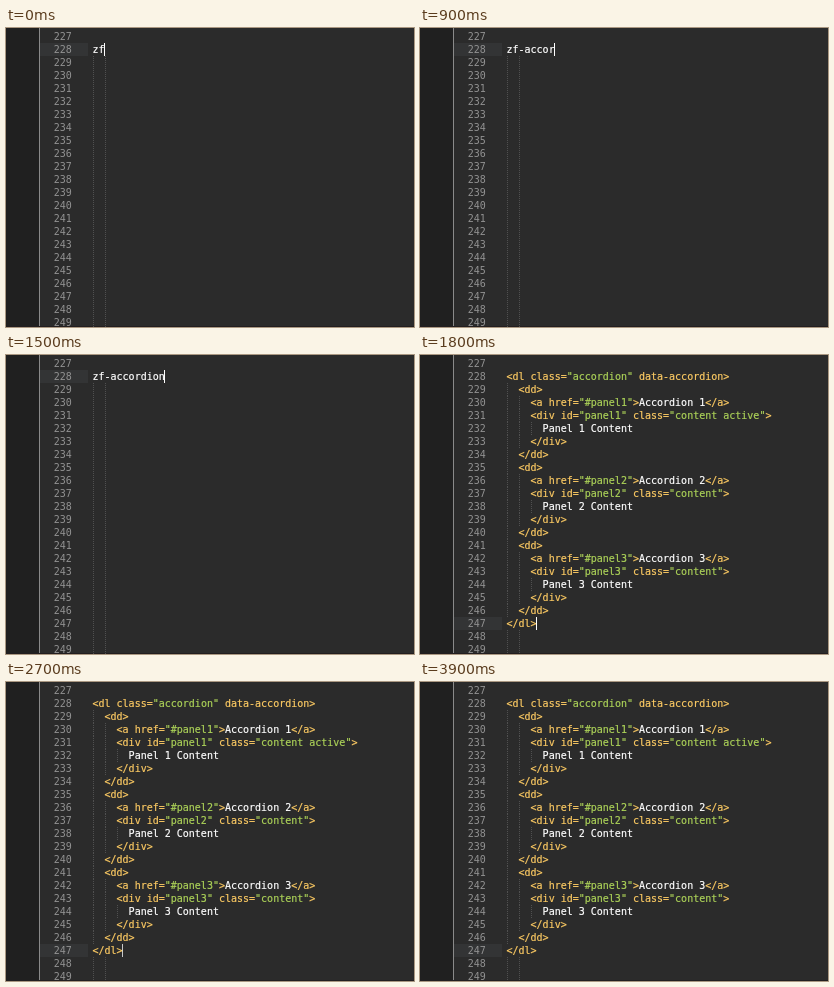
Write an HTML page that moves like this. It is 408x299 px and loops after 3940 ms.

```html
<!DOCTYPE html>
<html lang="en">
<head>
<meta charset="utf-8">
<title>Snippet expansion</title>
<style>
  html, body { margin: 0; width: 100%; height: 100%; overflow: hidden; background: #2b2b2b; }
  svg { display: block; width: 408px; height: 299px; }
  text {
    font: 10px "DejaVu Sans Mono", "Liberation Mono", monospace;
    white-space: pre;
    stroke-width: .2px;
  }
  .number { fill: #929292; }
  .plain { fill: #fff; stroke: #fff; }
  .tag { fill: #fcca63; stroke: #fcca63; }
  .string { fill: #acd258; stroke: #acd258; }
  .guide { stroke: #505050; stroke-dasharray: 1 1; }
</style>
</head>
<body>
<svg id="stage" viewBox="0 0 408 299"></svg>
<script>
const LOOP = 3940;
const EXPAND_AT = 1800;
const LINE = 13, CHAR = 6.02, LEFT = 86.5;
const FIRST = 227, LAST = 249, START = 228;
const WORD = "zf-accordion";

// [time, visible characters]
const typing = [[0, 2], [150, 3], [300, 4], [600, 5], [750, 6], [900, 8], [1200, 9], [1350, 11], [1500, 12]];
// [time, caret opacity]
const blink = [[0, 1], [2100, .5], [2250, 0], [2700, .75], [2850, 1], [3150, .5], [3300, 0], [3750, .5], [3900, 0]];

const stage = document.getElementById("stage");
const top_ = line => 2 + (line - FIRST) * LINE;
const baseline = line => top_(line) + 10;

function add(parent, name, attrs = {}, content = "") {
  const node = document.createElementNS("http://www.w3.org/2000/svg", name);
  for (const key in attrs) node.setAttribute(key, attrs[key]);
  node.textContent = content;
  parent.appendChild(node);
  return node;
}

const rect = (x, y, width, height, fill) => add(stage, "rect", { x, y, width, height, fill });

function guide(parent, level, from, to) {
  const x = 87.5 + level * 12;
  add(parent, "line", { class: "guide", x1: x, x2: x, y1: top_(from), y2: top_(to + 1) });
}

function panel(n) {
  const active = n === 1 ? " active" : "";
  return [
    "  <dd>",
    `    <a href="#panel${n}">Accordion ${n}</a>`,
    `    <div id="panel${n}" class="content${active}">`,
    `      Panel ${n} Content`,
    "    </div>",
    "  </dd>"
  ];
}

// Splits markup into tags, quoted strings inside tags, and plain text.
function highlight(parent, source) {
  for (const part of source.match(/<[^>]*>|[^<]+/g)) {
    if (part[0] !== "<") {
      add(parent, "tspan", { class: "plain" }, part);
      continue;
    }
    for (const piece of part.match(/"[^"]*"|[^"]+/g)) {
      add(parent, "tspan", { class: piece[0] === '"' ? "string" : "tag" }, piece);
    }
  }
}

rect(0, 0, 33, 299, "#202020");
rect(33, 0, 1, 299, "#8a8a8a");
const activeLine = rect(34, 0, 48, LINE, "#333435");
rect(0, 298, 408, 1, "#221e20");

for (let line = FIRST; line <= LAST; line++) {
  add(stage, "text", { class: "number", x: 47.8, y: baseline(line) }, line);
}

const before = add(stage, "g");
guide(before, 0, START + 1, LAST);
guide(before, 1, START + 1, LAST);
const typed = add(before, "text", { class: "plain", x: LEFT, y: baseline(START) });

const snippet = ['<dl class="accordion" data-accordion>', ...panel(1), ...panel(2), ...panel(3), "</dl>"];
const END = START + snippet.length - 1;
const after = add(stage, "g");
snippet.forEach((source, i) => {
  const line = START + i;
  const code = source.trimStart();
  const indent = source.length - code.length;
  for (let level = 0; level < indent / 2; level++) guide(after, level, line, line);
  highlight(add(after, "text", { x: LEFT + indent * CHAR, y: baseline(line) }), code);
});
guide(after, 0, END + 1, LAST);
guide(after, 1, END + 1, LAST);

const caret = rect(0, 0, 1, LINE, "#fff");

function valueAt(steps, time) {
  let value = steps[0][1];
  for (const [start, next] of steps) if (time >= start) value = next;
  return value;
}

function draw(time) {
  const expanded = time >= EXPAND_AT;
  const count = valueAt(typing, time);
  const line = expanded ? END : START;
  const column = expanded ? "</dl>".length : count;
  before.style.display = expanded ? "none" : "";
  after.style.display = expanded ? "" : "none";
  typed.textContent = WORD.slice(0, count);
  activeLine.setAttribute("y", top_(line));
  caret.setAttribute("x", Math.floor(86.4 + column * CHAR));
  caret.setAttribute("y", top_(line));
  caret.setAttribute("opacity", valueAt(blink, time));
}

const began = performance.now();
function tick() {
  draw((performance.now() - began) % LOOP);
  requestAnimationFrame(tick);
}
tick();
</script>
</body>
</html>
```
